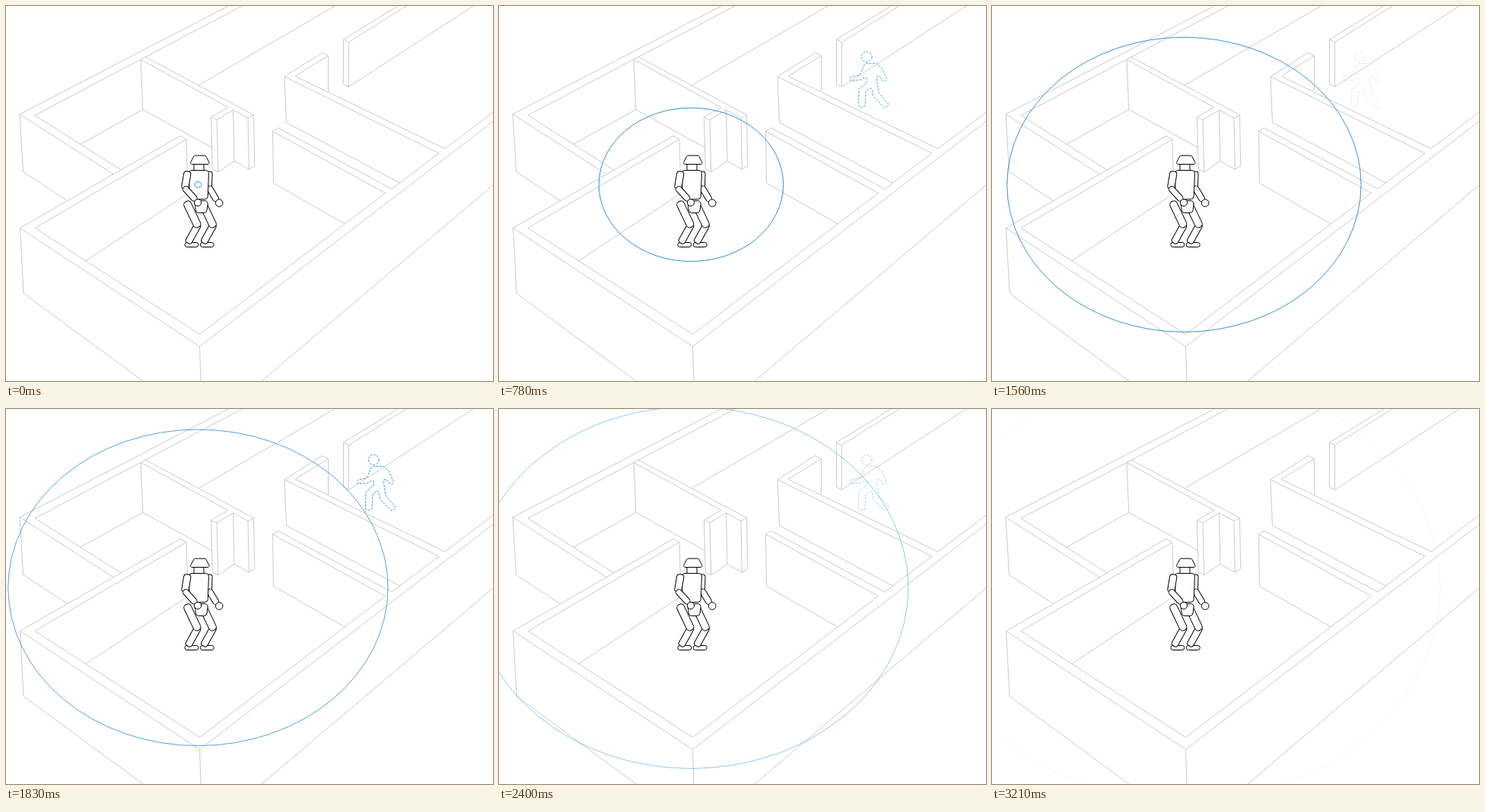
Recreate the animation shown at these times as an HTML page with a canvas. Size 640 by 494 pixels, loop 3.33 s.

```html
<!DOCTYPE html>
<html lang="en">
<head>
<meta charset="utf-8">
<title>Robot sensing a person</title>
<style>
html, body { margin: 0; width: 100%; height: 100%; overflow: hidden; background: #fff; }
canvas { display: block; }
</style>
</head>
<body>
<canvas id="stage" width="640" height="494"></canvas>
<script>
const ctx = document.getElementById('stage').getContext('2d');
const LOOP = 3330, STEP = 30, LAST = 3210, TURN = 1500;
const BLUE = '#338fdb', WALL = '#cbcbcb';

const clamp = v => Math.max(0, Math.min(1, v));

function line(...points) {
  ctx.beginPath();
  points.forEach(p => ctx.lineTo(...p));
  ctx.stroke();
}

function paint() {
  ctx.fill();
  ctx.stroke();
}

function disc(x, y, r) {
  ctx.beginPath();
  ctx.arc(x, y, r, 0, Math.PI * 2);
  paint();
}

function box(x, y, w, h, r) {
  ctx.beginPath();
  ctx.roundRect(x, y, w, h, r);
  paint();
}

// Rounded bar around the segment from (x1,y1) to (x2,y2)
function limb(x1, y1, x2, y2, w, r = w / 2) {
  const len = Math.hypot(x2 - x1, y2 - y1);
  ctx.save();
  ctx.translate(x1, y1);
  ctx.rotate(Math.atan2(y2 - y1, x2 - x1));
  box(-w / 2, -w / 2, len + w, w, r);
  ctx.restore();
}

// Closed polygon with softened corners
function soft(p, r) {
  const n = p.length, a = p[n - 1], b = p[0];
  ctx.beginPath();
  ctx.moveTo((a[0] + b[0]) / 2, (a[1] + b[1]) / 2);
  p.forEach((q, i) => ctx.arcTo(...q, ...p[(i + 1) % n], r));
  ctx.closePath();
}

// Trapezoid centred on x, half widths a at the top and b at the bottom
function trapezoid(x, top, a, bottom, b, r) {
  soft([[x - a, top], [x + a, top], [x + b, bottom], [x - b, bottom]], r);
  paint();
}

// Point on the floor below a wall top, seen in perspective
function foot([x, y]) {
  return [x + 4.8 - 0.011 * x, y + 67.2 - 0.04 * x + 0.000033 * x * x + y / 15];
}

function drawBackRoom() {
  const corner = [18, 142.5], joint = [177, 70.5], nook = [298.5, 137];
  const endA = [269.5, 146.5], endB = [277, 150];
  const tipA = [318, 147.5], tipB = [325.5, 143.5];
  line([292, 0], corner, foot(corner), [80.5, 256.5]);
  line(corner, [141, 221.5]);
  line([310, 0], [38, 144], [151, 216]);
  line([98, 182], foot(joint), [270.5, 186.5]);
  line(foot(joint), joint, [292, 133.5], endA, foot(endA), foot(endB), endB, endA);
  line([183, 67], tipB, foot(tipB), foot(tipA), tipA, tipB);
  line(tipA, nook, endB);
  line(foot(tipA), foot(nook), nook);
  line(foot(endB), foot(nook));
  line([253, 104.5], [432, 0]);
}

function drawFrontRoom() {
  const left = [18.5, 292.5], near = [254.5, 448.5], inner = [254.5, 432.5];
  const end = [237, 175.5], side = [350.5, 165];
  line([180, 494], foot(left), left, [229, 171], end, [38, 292.5], inner, [498.5, 246.5], side);
  line(end, foot(end), [105, 335.5]);
  line(left, near, [256, 494]);
  line(near, [640, 152]);
  line([336, 494], [640, 236]);
  line([445, 287], foot(side), side, [357.5, 160.5], [507, 241], [569, 194]);
}

function drawFarRooms() {
  const bend = [366, 93], end = [423.5, 65.5];
  const postA = [443.5, 44], postB = [450.5, 47.5];
  line([569, 194], bend, [368.5, 153.5], [517.5, 233]);
  line(bend, [415.5, 61.5], end, [423.5, 112.5]);
  line(end, [380, 92.5], [577, 188], [640, 140]);
  line([515, 0], postA, foot(postA), foot(postB), [614, 0]);
  line(postA, postB, foot(postB));
  line(postB, [526, 0]);
}

function drawLeg(x) {
  box(x - 4, 311.5, 18, 6, 3);
  limb(x + 12, 290.5, x + 2.2, 308.3, 9, 3.5);
  limb(x, 262, x + 11.8, 286.8, 10, 4.5);
}

function drawRobot() {
  ctx.strokeStyle = '#000';
  ctx.fillStyle = '#fff';
  // far side
  limb(267, 222, 266.5, 239, 8, 3);
  limb(268, 241, 275.5, 253.5, 8);
  disc(280.2, 259.5, 4.8);
  drawLeg(259.3);
  // body
  box(247, 207, 13, 11, 0);
  trapezoid(254.8, 197, 7.5, 208.5, 13.5, 2);
  trapezoid(256.7, 256.5, 9, 272.5, 7, 4);
  trapezoid(253.3, 216.5, 13.3, 254.5, 11.8, 4);
  // near side
  drawLeg(238.9);
  limb(238, 222.5, 235.7, 236.5, 9.3, 3.5);
  limb(236.5, 241.5, 247, 253, 8);
  disc(252, 259, 4.6);
}

function drawPerson(alpha) {
  ctx.save();
  ctx.globalAlpha = alpha;
  ctx.strokeStyle = BLUE;
  ctx.setLineDash([3, 1.5]);
  ctx.beginPath();
  ctx.arc(483.3, 66.8, 6.8, 0, Math.PI * 2);
  ctx.stroke();
  soft([
    [481, 75.5], [496, 75.5], [503, 82], [510.5, 98], [505, 99.5],
    [494.5, 85], [499, 114], [512.5, 130], [507, 135], [492, 119],
    [489.5, 106], [482, 112.5], [481, 133], [472.5, 133], [473, 109],
    [483, 101], [484, 91], [476.5, 97], [462, 99], [461, 93.5], [474, 91]
  ], 2.5);
  ctx.stroke();
  ctx.restore();
}

// The ring grows fast, then slows down while it fades away
function drawRing(t) {
  const late = Math.max(0, t - TURN);
  const rx = 4.6 + 0.1495 * Math.min(t, TURN) + 0.063 * late;
  ctx.save();
  ctx.globalAlpha = clamp(1 - late / 1800);
  ctx.strokeStyle = BLUE;
  ctx.beginPath();
  ctx.ellipse(252.4, 235.3, rx, rx * 0.8345, 0, 0, Math.PI * 2);
  ctx.stroke();
  ctx.restore();
}

// Two pulses: fade in, hold, fade out
function personAlpha(t) {
  const p = t % TURN;
  return t < 2 * TURN ? clamp(Math.min(p / 350, (1020 - p) / 300)) : 0;
}

function draw(t) {
  ctx.fillStyle = '#fff';
  ctx.fillRect(0, 0, 640, 494);
  ctx.lineWidth = 1;
  ctx.lineJoin = 'round';
  ctx.strokeStyle = WALL;
  drawBackRoom();
  drawFrontRoom();
  drawFarRooms();
  drawRobot();
  drawPerson(personAlpha(t));
  drawRing(t);
}

const start = performance.now();
function tick(now) {
  const t = Math.max(0, now - start) % LOOP;
  draw(Math.min(LAST, Math.floor(t / STEP) * STEP));
  requestAnimationFrame(tick);
}
draw(0);
requestAnimationFrame(tick);
</script>
</body>
</html>
```
